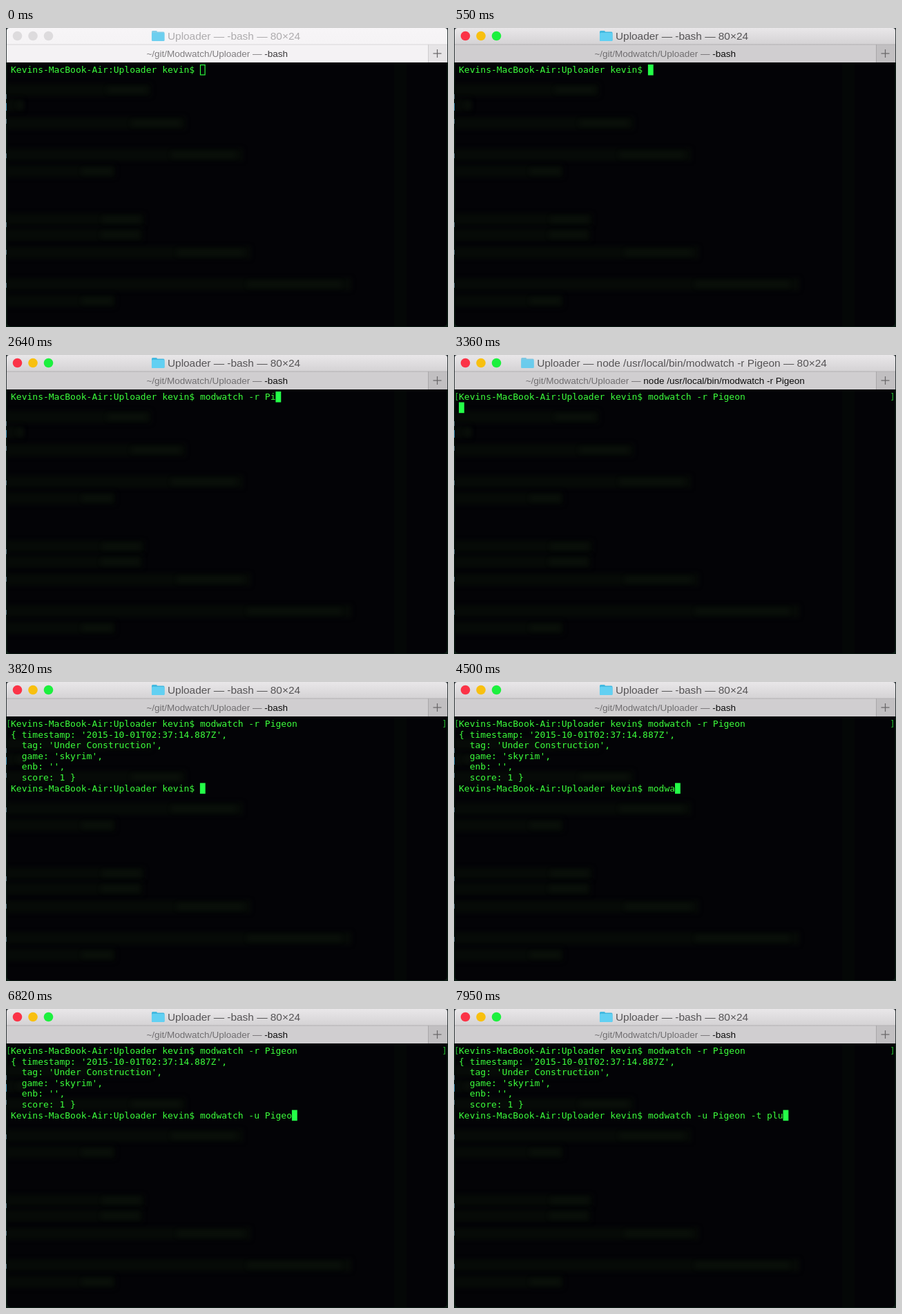
Animation of 640x434 px, one loop 8 s. Source, as an HTML page with a canvas:

```html
<!DOCTYPE html>
<html lang="en">
<head>
<meta charset="utf-8">
<title>Terminal session</title>
<style>
  html, body { margin: 0; width: 100%; height: 100%; overflow: hidden; background: #020204; }
  canvas { display: block; }
</style>
</head>
<body>
<canvas id="stage" width="640" height="434"></canvas>
<script>
const ctx = document.getElementById('stage').getContext('2d');

const LOOP = 8000;
const FOCUS = 420, ENTER = 3200, OUTPUT = 3800;
const LEFT = 7, TOP = 53, COL = 7.825, ROW = 15.6;
const MONO = '13px "DejaVu Sans Mono", monospace';
const sans = size => `${size}px "Liberation Sans", Arial, sans-serif`;

const PROMPT = 'Kevins-MacBook-Air:Uploader kevin$ ';
const FIRST = 'modwatch -r Pigeon';
const SECOND = 'modwatch -u Pigeon -t plu';
const RESULT = [
  "{ timestamp: '2015-10-01T02:37:14.887Z',",
  "  tag: 'Under Construction',",
  "  game: 'skyrim',",
  "  enb: '',",
  '  score: 1 }'
];

// Typing rhythm as [time, characters typed], linear in between
const FIRST_KEYS = [[650, 0], [1420, 6], [2330, 13], [2520, 14], [3060, 18]];
const SECOND_KEYS = [[3870, 0], [4460, 5], [4950, 8], [5250, 9], [5600, 10], [7890, 25]];

function typed(text, keys, t) {
  let count = 0;
  for (let i = 1; i < keys.length; i++) {
    const [t0, n0] = keys[i - 1], [t1, n1] = keys[i];
    if (t >= t0) count = n0 + Math.floor((n1 - n0) * Math.min(1, (t - t0) / (t1 - t0)) + 1e-6);
  }
  return text.slice(0, count);
}

function rect(x, y, w, h, color) {
  ctx.fillStyle = color;
  ctx.fillRect(x, y, w, h);
}

function label(text, x, y, font, color) {
  ctx.font = font;
  ctx.fillStyle = color;
  ctx.fillText(text, x, y);
}

function width(text, font) {
  ctx.font = font;
  return ctx.measureText(text).width;
}

// Blurred code that shimmers through the translucent window
function makeBackdrop() {
  const layer = document.createElement('canvas');
  layer.width = 640;
  layer.height = 434;
  const g = layer.getContext('2d');
  g.fillStyle = '#0c1c14';
  g.fillRect(0, 0, 640, 434);
  g.fillStyle = '#507078';
  for (const y of [96, 132, 182, 282, 322, 370]) g.fillRect(0, y, 1, 7);
  g.fillStyle = '#3d8fb0';
  g.fillRect(0, 109, 1, 11);

  g.beginPath();
  g.roundRect(1.5, 40, 637, 393, 5);
  g.clip();
  g.fillStyle = '#030306';
  g.fillRect(0, 0, 640, 434);
  g.fillStyle = '#040706';
  g.fillRect(562, 50, 18, 384);
  g.filter = 'blur(3px)';
  const lines = [[90, 210], [112, 25], [138, 260], [184, 343], [208, 158],
                 [278, 200], [300, 198], [326, 354], [372, 500], [396, 158]];
  for (const [y, end] of lines) {
    g.fillStyle = '#060a07';
    g.fillRect(0, y - 9, end, 18);
    g.fillStyle = '#0a100a';
    g.fillRect(end * 0.7, y - 4, end * 0.27, 8);
  }
  return layer;
}
const backdrop = makeBackdrop();

function folder(x, alpha) {
  ctx.globalAlpha = alpha;
  ctx.fillStyle = '#43b9e0';
  ctx.beginPath();
  ctx.roundRect(x, 4, 8, 6, 1.5);
  ctx.roundRect(x, 5.5, 18.5, 13.5, 1.5);
  ctx.fill();
  ctx.fillStyle = '#62d0f2';
  ctx.beginPath();
  ctx.roundRect(x, 7, 18.5, 12, 1.5);
  ctx.fill();
  ctx.globalAlpha = 1;
}

function chrome(active, process, busy) {
  rect(0, 0, 640, 50, '#30383a');
  const bar = ctx.createLinearGradient(0, 0, 0, 24);
  bar.addColorStop(0, active ? '#e9e7e9' : '#f7f5f7');
  bar.addColorStop(1, active ? '#d4d2d4' : '#f5f3f5');
  ctx.fillStyle = bar;
  ctx.beginPath();
  ctx.roundRect(1, 0, 638, 24, [4, 4, 0, 0]);
  ctx.fill();
  rect(1, 24, 638, 26, active ? '#d0ced0' : '#f4f2f4');
  rect(611, 24, 28, 26, active ? '#c1bfc1' : '#e6e4e6');
  rect(1, 23.5, 638, 1, active ? '#b4b2b4' : '#dad8da');
  rect(611, 24, 1, 26, active ? '#a9a7a9' : '#cfcdcf');
  rect(618.5, 36.4, 12, 1.2, '#686668');
  rect(623.9, 31, 1.2, 12, '#686668');

  const lights = active ? ['#fb3347', '#f8c010', '#1cf03e'] : Array(3).fill('#dddbdd');
  lights.forEach((color, i) => {
    ctx.fillStyle = color;
    ctx.beginPath();
    ctx.arc(16.5 + 22.5 * i, 11.5, 6.8, 0, 7);
    ctx.fill();
  });

  const title = `Uploader — ${process} — 80×24`, titleFont = sans(15.4);
  const titleX = 330 - width(title, titleFont) / 2;
  folder(titleX - 23, active && !busy ? 1 : 0.65);
  label(title, titleX, 17.3, titleFont, active ? '#565456' : '#aeacae');

  const path = '~/git/Modwatch/Uploader — ', tabFont = sans(13.5);
  const pathWidth = width(path, tabFont);
  const tabX = 305.7 - (pathWidth + width(process, tabFont)) / 2;
  label(path, tabX, 41.6, tabFont, active ? '#706e70' : '#807e80');
  label(process, tabX + pathWidth, 41.6, tabFont, active ? '#0c0c0c' : '#3c3a3c');
}

function terminal(lines, active, marked) {
  lines.forEach((line, row) => label(line, LEFT, TOP + row * ROW + 12, MONO, '#3cff3c'));
  if (marked) {
    label('[', 0, TOP + 11.7, MONO, '#24b430');
    label(']', 631, TOP + 11.7, MONO, '#24b430');
  }
  const row = lines.length - 1;
  const x = LEFT + lines[row].length * COL, y = TOP + row * ROW;
  if (active) {
    rect(x, y, COL, ROW, '#24ff48');
  } else {
    ctx.strokeStyle = '#2cf83c';
    ctx.lineWidth = 1.2;
    ctx.strokeRect(x + 0.6, y + 0.6, COL - 1.2, ROW - 1.2);
  }
}

function draw(t) {
  const active = t >= FOCUS, entered = t >= ENTER, done = t >= OUTPUT;
  const busy = entered && !done;
  const lines = [PROMPT + typed(FIRST, FIRST_KEYS, t)];
  if (busy) lines.push('');
  if (done) lines.push(...RESULT, PROMPT + typed(SECOND, SECOND_KEYS, t));

  ctx.drawImage(backdrop, 0, 0);
  chrome(active, busy ? 'node /usr/local/bin/' + FIRST : '-bash', busy);
  terminal(lines, active, entered);
}

function frame() {
  draw(performance.now() % LOOP);
  requestAnimationFrame(frame);
}
frame();
</script>
</body>
</html>
```
